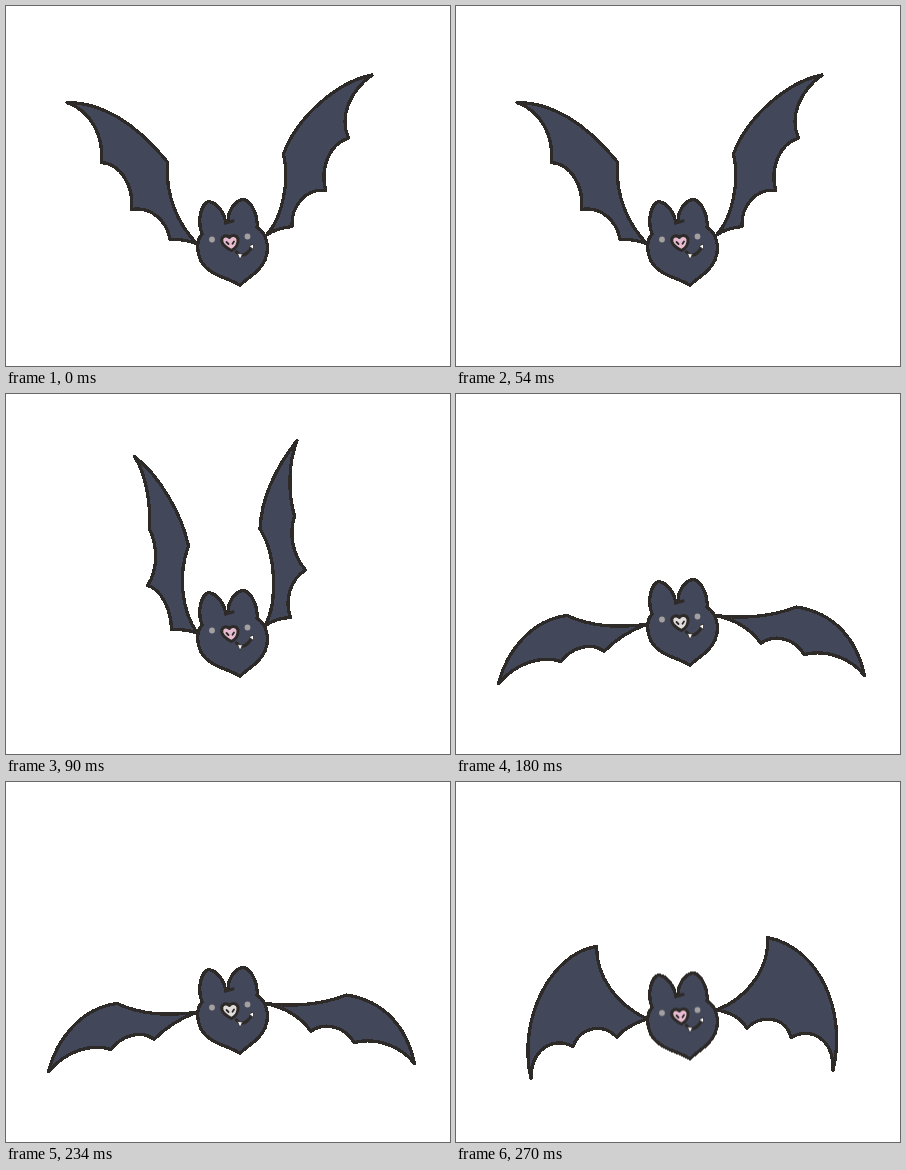
Animation, 444 px wide and 360 px high, one loop 0.36 s. Source, as an HTML page:

```html
<!DOCTYPE html>
<html lang="en">
<head>
<meta charset="utf-8">
<title>Flapping bat</title>
<style>
  html, body { margin: 0; width: 100%; height: 100%; overflow: hidden; background: #fff; }
  svg { display: block; width: 444px; height: 360px; }
  .fur { fill: #42475a; stroke: #2e2a28; stroke-width: 3.3; stroke-linejoin: round; stroke-linecap: round; shape-rendering: crispEdges; }
  .line { fill: none; stroke: #2e2a28; stroke-width: 3.2; stroke-linejoin: round; stroke-linecap: round; }
  .fang { fill: #fff; stroke: #2e2a28; stroke-width: .8; stroke-linejoin: round; }

  .wings { visibility: hidden; animation: pose 360ms step-end infinite; }
  .raised { animation-delay: -360ms; }
  .high { animation-delay: -270ms; }
  .spread { animation-delay: -180ms; }
  .folding { animation-delay: -90ms; }
  @keyframes pose {
    0% { visibility: visible; }
    25%, 100% { visibility: hidden; }
  }

  .head { animation: bob 360ms step-end infinite; }
  @keyframes bob {
    0%, 100% { transform: translateY(0); }
    25% { transform: translateY(3px); }
    50% { transform: translateY(-8px); }
    75% { transform: translateY(-2.5px); }
  }

  .snout { fill: #e8bbd0; stroke: #2e2a28; stroke-width: 3; stroke-linejoin: round; animation: pale 360ms step-end infinite; }
  @keyframes pale {
    0%, 75%, 100% { fill: #e8bbd0; }
    50% { fill: #e2dddd; }
  }
</style>
</head>
<body>
<svg viewBox="0 0 444 360">
  <g class="wings raised fur">
    <path d="M61 96.500C94 96 129 116 161.500 156C159 190 172 218 191 238Q180 233 164 233.500C161 215 145 200 125.500 203.500C128 180 115 158 95.500 156.500C98 130 85 105 61 96.500Z"/>
    <path d="M366 69C331 76 291 111 277.500 148C284 176 276 212 261 228.500Q272 222 286 220.500C285 200 300 182 319.500 184.500C314 160 324 138 342.500 132C333 110 344 85 366 69Z"/>
  </g>
  <g class="wings high fur">
    <path d="M128.500 62.500C154 82 176 121 182.500 152C172 180 175 215 191 239Q180 235 165.500 235.500C165 215 155 195 141.500 191.500C153 175 151 150 143.500 135C145 110 140 80 128.500 62.500Z"/>
    <path d="M291 46.500C272 71 255.500 101 254 135C270 160 272 206 259.500 231.500Q270 224 284.500 223.500C278 205 285 185 299.500 176C286 160 283 140 288.500 122C282 100 282 70 291 46.500Z"/>
  </g>
  <g class="wings spread fur">
    <path d="M42.500 289.500C51 256 76 226 111 221.500C135 232.500 160 234 190 230.500Q165 240 148 257.500C135 247 115 254 105 267.500C85 261 60 269 42.500 289.500Z"/>
    <path d="M408.500 281.500C401 246 379 219 340.500 213C315 223 285 225 260 221.500Q290 228 305 249.500C318 239 340 245 348 260.500C370 255 395 264 408.500 281.500Z"/>
  </g>
  <g class="wings folding fur">
    <path d="M75 296.500C61 236 96 171 140.500 164.500C140.500 195 160 222 191 237Q168 245 161 255.500C148 241 125 244 117 264.500C95 254 75 269 75 296.500Z"/>
    <path d="M377 288.500C391 230 364 166 311.500 155.500C313.500 185 293 215 261 228Q283 232 291 246.500C303 232 330 234 335 255.500C355 244 378 257 377 288.500Z"/>
  </g>

  <g class="head">
    <path class="fur" d="M196 228C190.500 213 196 197 203 195.500C211 197 219 207 219.500 217L222 215C222 204 230 194 237.500 193.500C245.500 195 252.500 210 251 221.500C261 227 264 242 259 254C253 267 243 270 234 279.500C225 272 204 271 195 255C189.500 243 191.500 233 196 228Z"/>
    <path class="line" d="M219.500 217L227 215"/>
    <g fill="#a3a09f">
      <circle cx="206" cy="233.500" r="2.9"/>
      <circle cx="241.500" cy="230.500" r="2.9"/>
    </g>
    <path class="line" d="M230.500 246Q236 252 241 247Q245 244 246 239.500"/>
    <path class="fang" d="M231.500 247.500L236.500 248L234 253.500Z"/>
    <path class="fang" d="M243 240L247.500 238L247.500 243.500Z"/>
    <path class="snout" d="M223.500 231.500C219.500 228 214.500 231 216 236C217.500 240.500 221.500 242.500 225.500 244.500C229.500 242.500 232.500 238 232 233C230.500 228.500 225.500 228.500 223.500 231.500Z"/>
    <path class="line" style="stroke-width:1.8" d="M220.500 236L222.500 238M228 235.500L226.500 237.800"/>
  </g>
</svg>
</body>
</html>
```
